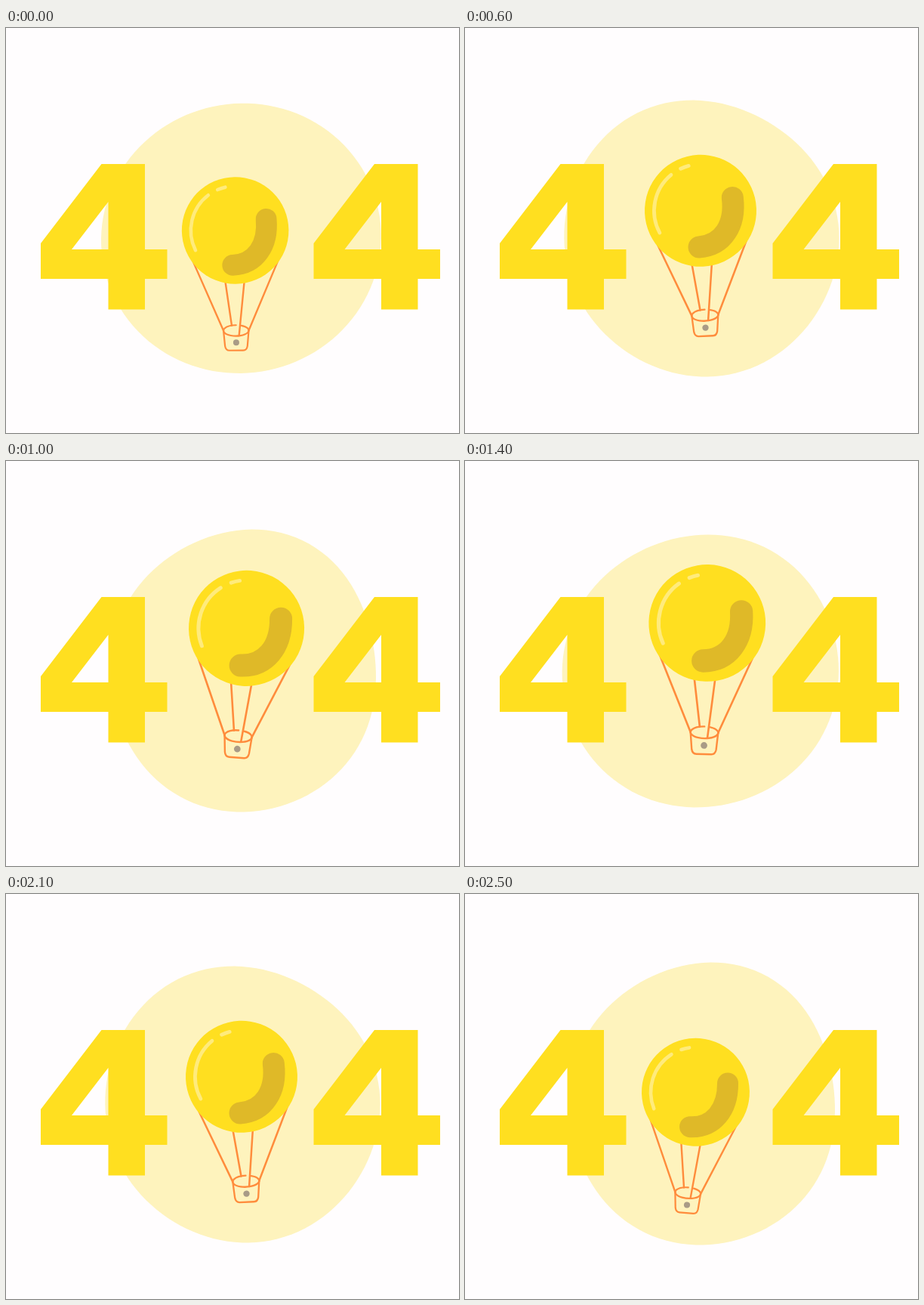
Animation of 600 by 536 pixels, one loop 2600 ms. Source, as an HTML page with a canvas:

```html
<!DOCTYPE html>
<html lang="en">
<head>
<meta charset="utf-8">
<title>404</title>
<style>
html, body { margin: 0; width: 100%; height: 100%; overflow: hidden; background: #fffdfe; }
canvas { display: block; }
</style>
</head>
<body>
<canvas id="stage" width="600" height="536"></canvas>
<script>
const ctx = document.getElementById('stage').getContext('2d');
const LOOP = 2600, STEP = 100;
const TAU = Math.PI * 2;
const rad = deg => deg * Math.PI / 180;
const cos = deg => Math.cos(rad(deg));
const sin = deg => Math.sin(rad(deg));

const YELLOW = '#ffdf20', PALE = '#fef3bd', SHADE = '#dfb928';
const SHINE = '#ffeb7c', ROPE = '#ff8c3c', BADGE = '#a99b86';

function stroke(color, width, build) {
  ctx.strokeStyle = color;
  ctx.lineWidth = width;
  ctx.beginPath();
  build();
  ctx.stroke();
}

function disc(x, y, r, color) {
  ctx.fillStyle = color;
  ctx.beginPath();
  ctx.arc(x, y, r, 0, TAU);
  ctx.fill();
}

// A circle that wobbles with a few standing waves
function drawBlob(t) {
  const phase = 360 * t / 1500;
  const cx = 312.7 - 2.6 * cos(phase - 60), cy = 278.3;
  ctx.fillStyle = PALE;
  ctx.beginPath();
  for (let a = 0; a < 360; a += 3) {
    const r = 182
      + 5.4 * cos(2 * a) * cos(phase - 51)
      + 2.8 * sin(2 * a) * cos(phase - 122)
      + 1.8 * cos(3 * a + 22) * sin(phase)
      + 1.9 * cos(4 * a + 68) * sin(phase);
    ctx.lineTo(cx + r * cos(a), cy + r * sin(a));
  }
  ctx.fill();
}

function drawFour(x) {
  ctx.save();
  ctx.translate(x, 180);
  ctx.fillStyle = YELLOW;
  ctx.beginPath();
  // Diagonal and crossbar with the counter cut out
  ctx.moveTo(80.5, 0);
  ctx.lineTo(138, 0);
  ctx.lineTo(138, 152);
  ctx.lineTo(0, 152);
  ctx.lineTo(0, 105);
  ctx.closePath();
  ctx.moveTo(89.5, 50);
  ctx.lineTo(41, 113);
  ctx.lineTo(89.5, 113);
  ctx.closePath();
  ctx.fill('evenodd');
  ctx.fillRect(89.5, 150, 48.5, 42.5);
  ctx.fillRect(136, 113, 31.5, 39);
  ctx.restore();
}

function drawBasket() {
  const w = 17.5, rim = 138.5, base = 166;
  stroke(ROPE, 2.5, () => {
    for (const side of [-1, 1]) {
      ctx.moveTo(side * 59, 42);
      ctx.lineTo(side * w, rim);
    }
    ctx.moveTo(-14.5, 70);
    ctx.lineTo(-6, rim - 7);
    ctx.moveTo(12, 70);
    ctx.lineTo(4, rim + 7);
  });
  // Rim, left open at the back
  stroke(ROPE, 2.3, () => ctx.ellipse(0, rim, w, 7.5, 0, rad(295), rad(270 + 360)));
  stroke(ROPE, 2.3, () => {
    ctx.moveTo(-w, rim);
    ctx.lineTo(-w + 2, base - 6);
    ctx.quadraticCurveTo(-w + 3, base, -w + 8, base);
    ctx.lineTo(w - 8, base);
    ctx.quadraticCurveTo(w - 3, base, w - 2, base - 6);
    ctx.lineTo(w, rim);
  });
  disc(0, 155, 4.2, BADGE);
}

function drawBalloon(t) {
  const lift = cos(360 * (t - 1350) / 3000);
  const swing = cos(360 * (t - 350) / 1500);
  const scale = (74 + 3.4 * lift) / 74;
  ctx.save();
  ctx.translate(312 + 8.8 * lift, 241.8 - 27.5 * lift);
  ctx.rotate(rad(-4.8 * swing));
  ctx.scale(scale, scale);
  ctx.lineCap = ctx.lineJoin = 'round';
  drawBasket();
  disc(0, 0, 74, YELLOW);
  stroke(SHADE, 29, () => {
    ctx.moveTo(43, -15.5);
    ctx.bezierCurveTo(46, 20.5, 28, 47, -4, 48);
  });
  stroke(SHINE, 4.8, () => ctx.arc(0, 0, 61.5, rad(154), rad(233)));
  stroke(SHINE, 4.8, () => ctx.arc(0, 0, 61.5, rad(247), rad(257.5)));
  ctx.restore();
}

function draw(now) {
  const t = Math.floor((now % LOOP) / STEP) * STEP;
  ctx.fillStyle = '#fffdfe';
  ctx.fillRect(0, 0, 600, 536);
  drawBlob(t);
  drawFour(46);
  drawFour(407.5);
  drawBalloon(t);
}

const start = performance.now();
function tick() {
  draw(performance.now() - start);
  requestAnimationFrame(tick);
}
tick();
</script>
</body>
</html>
```
